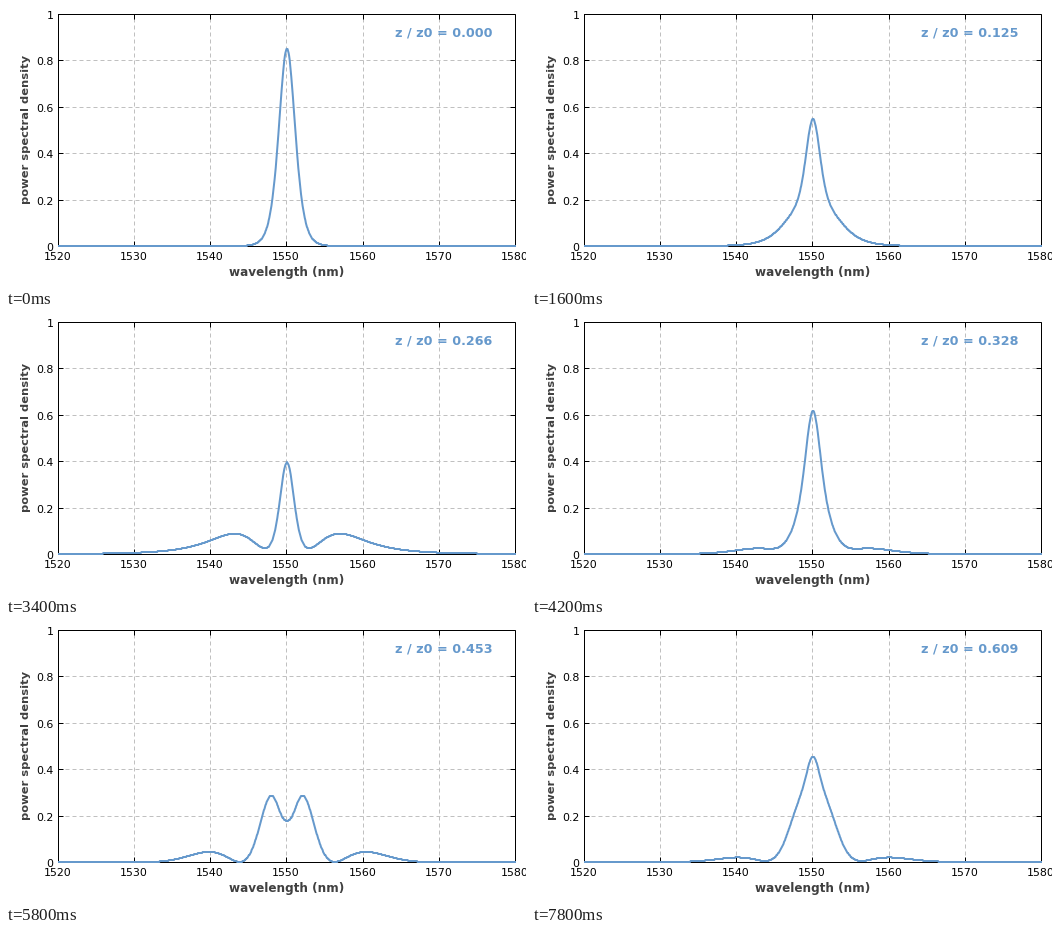
A matplotlib script for the animation above (8 s loop, 520 px wide and 280 px high).

```python
import numpy as np
import matplotlib.pyplot as plt
from matplotlib.animation import FuncAnimation

W, H, DPI = 520, 280, 100
PX = 72 / DPI
LEFT, RIGHT, TOP, BOTTOM = 52, 509, 8, 240
BLUE, GREY, DARK = "#6699cc", "#c0c0c0", "#404040"
FRAMES, STEP, SUB = 40, 1 / 64, 50
PERIOD = 1.004 * np.pi / 2   # soliton period in dispersion lengths, rounded up
C = 299792.458               # nm THz
T0 = 1 / 1.7627              # ps, sech width of a 1 ps pulse
CENTRE = 1550.0


def soliton_spectra(order=3, n=4096, span=200.0):
    """Split-step solution of the nonlinear Schroedinger equation."""
    t = (np.arange(n) - n // 2) * span / n
    w = 2 * np.pi * np.fft.fftfreq(n, span / n)
    dz = STEP * PERIOD / SUB
    half = np.exp(-0.25j * w ** 2 * dz)
    u = order / np.cosh(t)
    spectra = []
    for _ in range(FRAMES):
        spectra.append(np.fft.fftshift(np.abs(np.fft.fft(u)) ** 2))
        for _ in range(SUB):
            u = np.fft.ifft(half * np.fft.fft(u))
            u = u * np.exp(1j * np.abs(u) ** 2 * dz)
            u = np.fft.ifft(half * np.fft.fft(u))
    spectra = np.array(spectra)
    return np.fft.fftshift(w), 0.85 * spectra / spectra[0].max()


def px_x(nm):
    return LEFT + (nm - 1520) / 60 * (RIGHT - LEFT)


def px_y(v):
    return BOTTOM - v * (BOTTOM - TOP)


omega, psd = soliton_spectra()
near = np.abs(omega) < 16
wavelength = C / (C / CENTRE + omega[near] / (2 * np.pi * T0))
curve_x = px_x(wavelength) + 0.5
curve_y = np.round(px_y(psd[:, near]))   # whole pixel rows

plt.rcParams["font.family"] = "DejaVu Sans"
fig = plt.figure(figsize=(W / DPI, H / DPI), dpi=DPI, facecolor="white")
ax = fig.add_axes([0, 0, 1, 1])
ax.set(xlim=(0, W), ylim=(H, 0))
ax.axis("off")


def line(xs, ys, color="black", **kw):
    """One-pixel line; snapping centres whole coordinates on their pixel."""
    return ax.plot(xs, ys, color=color, lw=PX, snap=True,
                   solid_capstyle="butt", solid_joinstyle="miter", **kw)


def label(x, y, s, size=11, **kw):
    return ax.text(x, y, s, fontsize=size * PX, va="baseline", **kw)


dash = dict(color=GREY, linestyle=(0, (4, 3)), dash_capstyle="butt")
for nm in range(1520, 1581, 10):
    x = round(px_x(nm))
    if 1520 < nm < 1580:
        line([x, x], [BOTTOM, TOP], **dash)
        line([x, x], [BOTTOM, BOTTOM - 5])
        line([x, x], [TOP, TOP + 5])
    label(x, 254, str(nm), ha="center")
for k in range(6):
    y = round(px_y(k / 5))
    if 0 < k < 5:
        line([LEFT, RIGHT], [y, y], **dash)
        line([LEFT, LEFT + 5], [y, y])
        line([RIGHT, RIGHT - 5], [y, y])
    label(47.5, y + 4.6, f"{k / 5:g}", ha="right")
line([LEFT, RIGHT, RIGHT, LEFT, LEFT], [TOP, TOP, BOTTOM, BOTTOM, TOP])

label(280.5, 270, "wavelength (nm)", 12, ha="center", weight="bold",
      color=DARK)
ax.text(25, 123, "power spectral density", fontsize=11.5 * PX, rotation=90,
        ha="right", va="center", weight="bold", color=DARK)
readout = label(389, 31, "", 12.7, weight="bold", color=BLUE)
curve, = ax.plot([], [], color=BLUE, lw=2 * PX, solid_joinstyle="round")
clip = plt.Rectangle((LEFT, 0), RIGHT + 1 - LEFT, H, transform=ax.transData)
curve.set_clip_path(clip)


def draw(i):
    curve.set_data(curve_x, curve_y[i])
    readout.set_text(f"z / z0 = {i * STEP:.3f}")
    return curve, readout


anim = FuncAnimation(fig, draw, frames=FRAMES, interval=200,
                     repeat=True, repeat_delay=0)
plt.show()
```
